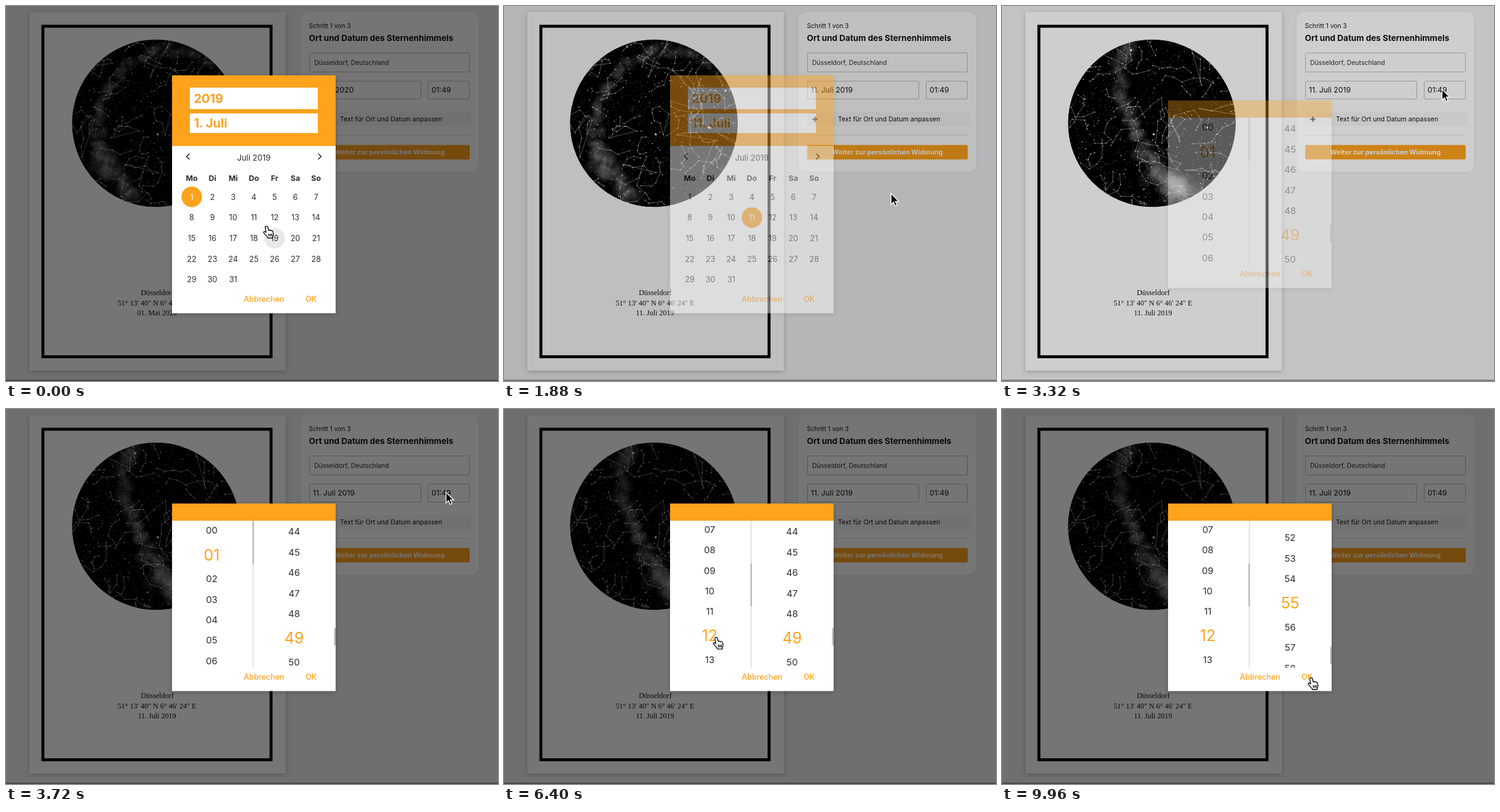
Animation, 800 px wide and 611 px high, one loop 10 s. Source, as an HTML page:

```html
<!DOCTYPE html>
<html lang="de">
<head>
<meta charset="utf-8">
<title>Sternenhimmel</title>
<style>
html, body { margin: 0; width: 100%; height: 100%; overflow: hidden; background: #f3f2f4; }
svg { display: block; width: 800px; height: 611px; }
text { font-family: Inter, "Open Sans", sans-serif; fill: #2c2c2e; white-space: pre; }
.serif { font-family: "Liberation Serif", serif; fill: #111; }
.mid { text-anchor: middle; }
.bold { font-weight: 700; }
.link { font-weight: 500; fill: #ffa21c; }
.white { fill: #fff; }
.orange { fill: #ffa21c; }
.ink { fill: #111; }
</style>
</head>
<body>
<script>
const LOOP = 10000, ORANGE = '#ffa21c', ROW = 33.4, GROW = 12;

// ---------- helpers ----------
const rect = (x, y, w, h, attrs) => `<rect x="${x}" y="${y}" width="${w}" height="${h}" ${attrs}/>`;
const text = (x, y, size, str, cls = '', id = '') =>
  `<text x="${x}" y="${y}" font-size="${size}" class="${cls}" ${id && `id="${id}"`}>${str}</text>`;
const line = (d, attrs) => `<path d="${d}" fill="none" ${attrs}/>`;
const clamp = v => Math.max(0, Math.min(1, v));
const ramp = (t, start, length) => clamp((t - start) / length);
const mix = (a, b, u) => a + (b - a) * u;

function randomizer(seed) {
  return () => {
    seed = (seed * 1664525 + 1013904223) % 4294967296;
    return seed / 4294967296;
  };
}

// ---------- star map ----------
const CX = 243.7, CY = 191, R = 136.5;

function skyMap(id, seed, band) {
  const rnd = randomizer(seed);
  const bell = () => rnd() + rnd() + rnd() - 1.5;
  const n1 = v => v.toFixed(1);
  const along = () => {
    const p = rnd() * (band.length - 1), i = Math.floor(p);
    return band[i].map((v, k) => mix(v, band[i + 1][k], p - i));
  };

  let haze = '';
  for (let i = 0; i < 330; i++) {
    const [x, y, w, glow] = along();
    const dark = rnd() < .16;
    const r = dark ? 1.5 + rnd() * 3 : 3 + rnd() * w * .55;
    haze += `<circle cx="${n1(x + bell() * w)}" cy="${n1(y + bell() * w * .8)}" r="${n1(r)}"
      fill="${dark ? '#000' : '#bbb'}" opacity="${n1(dark ? .3 : 0) || 0}"
      style="opacity:${dark ? .22 : (.1 * glow).toFixed(3)}"/>`;
  }

  const dots = ['', '', ''];
  const star = (size, x, y) => dots[size] += `M${n1(x)} ${n1(y)}h.01`;
  for (let i = 0; i < 760; i++) {
    const a = rnd() * 6.283, d = R * Math.sqrt(rnd());
    star(rnd() < .09 ? 1 : 0, CX + d * Math.cos(a), CY + d * Math.sin(a));
  }
  for (let i = 0; i < 160; i++) {
    const [x, y, w] = along();
    star(0, x + bell() * w, y + bell() * w);
  }

  // constellations: short wandering chains spread over a loose grid
  let chains = '';
  const step = 34;
  for (let gy = CY - R; gy < CY + R; gy += step) {
    for (let gx = CX - R; gx < CX + R; gx += step) {
      let x = gx + rnd() * step, y = gy + rnd() * step, a = rnd() * 6.283;
      const x0 = x, y0 = y, n = 2 + Math.floor(rnd() * 5);
      chains += `M${n1(x)} ${n1(y)}`;
      star(1, x, y);
      for (let k = 0; k < n; k++) {
        const len = 6 + rnd() * 15;
        a += (rnd() - .5) * 2.5;
        x += len * Math.cos(a);
        y += len * Math.sin(a);
        chains += `L${n1(x)} ${n1(y)}`;
        star(1, x, y);
      }
      if (n > 3 && rnd() < .4) chains += `L${n1(x0)} ${n1(y0)}`;
    }
  }
  const [bx, by] = band[0];
  star(2, bx - 2, by + 16);
  star(2, CX + 3, CY + 18);
  star(2, CX + 90, CY + 7);

  return `<g id="${id}" clip-path="url(#disc)">
    <circle cx="${CX}" cy="${CY}" r="${R}"/>
    <g filter="url(#soft)">${haze}</g>
    ${line(chains, 'stroke="#ddd" stroke-width=".7" opacity=".72"')}
    ${dots.map((d, i) => line(d, `stroke="#fff" stroke-linecap="round" stroke-width="${[.95, 1.8, 3.6][i]}" opacity="${[.75, .85, 1][i]}"`)).join('')}
  </g>`;
}

const skyMay = skyMap('skyMay', 71, [
  [362, 122, 8, .3], [310, 78, 10, .4], [245, 71, 12, .6], [188, 102, 11, .7],
  [152, 160, 10, .7], [147, 225, 13, .9], [165, 270, 18, 1], [205, 308, 18, .9]]);
const skyJuly = skyMap('skyJuly', 2019, [
  [212, 56, 13, .6], [189, 95, 10, .55], [193, 150, 11, .7],
  [218, 203, 13, .9], [240, 250, 15, 1], [268, 292, 24, 1], [290, 308, 28, 1]]);

// ---------- page ----------
const field = (x, y, w, h) => rect(x, y, w, h, 'rx="1.5" fill="#fff" stroke="#bdbcbe"');

const page = `
  ${rect(0, 0, 800, 611, 'fill="#f3f2f4"')}
  ${rect(38, 10, 417, 584, 'fill="#fff" filter="url(#shade)"')}
  ${rect(60, 33, 371, 538.5, 'fill="none" stroke="#000" stroke-width="4.8"')}
  ${skyMay}${skyJuly}
  ${text(246, 471, 12.2, 'Düsseldorf', 'serif mid')}
  ${text(245.5, 487.5, 12, '51° 13′ 40″ N 6° 46′ 24″ E', 'serif mid')}
  ${text(245.5, 504, 12, '', 'serif mid', 'posterDate')}
  ${rect(479, 10, 289, 260, 'rx="12" fill="#fff" filter="url(#faint)"')}
  ${text(492.5, 35.5, 10.2, 'Schritt 1 von 3', 'ink')}
  ${text(492.5, 56.5, 13.5, 'Ort und Datum des Sternenhimmels', 'bold ink')}
  ${field(493.5, 76.5, 260, 31)}
  ${text(501, 96, 10.5, 'Düsseldorf, Deutschland')}
  ${field(493.5, 122.5, 181, 29)}
  ${text(499, 140.5, 12.2, '', 'ink', 'fieldDate')}
  ${field(686.5, 122.5, 67, 29)}
  ${text(692, 140.5, 12.2, '01:49', 'ink')}
  ${rect(493, 173, 264, 22, 'fill="#f8f7f9"')}
  ${line('M501.5 184.5h8M505.5 180.5v8', 'stroke="#111" stroke-width="2"')}
  ${text(543, 188, 10.6, 'Text für Ort und Datum anpassen', 'ink')}
  ${line('M493 210.5H754', 'stroke="#c4c3c5" stroke-dasharray="1 1"')}
  ${rect(493, 226.5, 261, 23.5, `rx="2.5" fill="${ORANGE}"`)}
  ${text(623.5, 242, 10.8, 'Weiter zur persönlichen Widmung', 'bold white mid')}
  ${rect(0, 609, 800, 1.4, 'fill="#77767a"')}`;

// ---------- date dialog ----------
const dayX = c => 302 + 33.7 * c, dayY = r => 311 + 33.7 * r;
const dayPos = d => [dayX((d - 1) % 7), dayY(Math.floor((d - 1) / 7))];

let days = '';
for (let d = 1; d <= 31; d++) {
  const [x, y] = dayPos(d);
  days += text(x, y + 4.5, 12.6, d, 'mid', 'day' + d);
}
const buttons = y => text(419.5, y, 12.5, 'Abbrechen', 'link mid') + text(496, y, 12.5, 'OK', 'link mid');

const dateDialog = `<g id="dateDialog">
  ${rect(270, 113, 266, 387.5, 'fill="#fff" filter="url(#shade)"')}
  ${rect(270, 113, 266, 115, `fill="${ORANGE}"`)}
  ${rect(299, 133, 208, 35, 'fill="#fff"')}${rect(299, 175, 208, 32, 'fill="#fff"')}
  ${text(305.5, 158, 20, '2019', 'bold orange')}
  ${text(305.5, 197.5, 20, '', 'bold orange', 'headDate')}
  ${line('M298.5 240.5l-5 4.7 5 4.7M507.500 240.500l5 4.700-5 4.700', 'stroke="#222" stroke-width="1.4"')}
  ${text(403, 251.5, 13, 'Juli 2019', 'mid')}
  ${['Mo', 'Di', 'Mi', 'Do', 'Fr', 'Sa', 'So'].map((n, i) => text(dayX(i), 285, 12.4, n, 'bold mid')).join('')}
  <circle id="hover" r="16.8" fill="#e9e8ea"/>
  <circle id="chosen" r="16.7" fill="${ORANGE}"/>
  ${days}${buttons(482)}
</g>`;

// ---------- time dialog ----------
const numbers = (id, x, n) => Array.from({ length: n }, (_, i) =>
  text(x, 0, 15, String(i).padStart(2, '0'), 'mid', id + i)).join('');

const timeDialog = `<g id="timeDialog">
  ${rect(270, 154, 266, 305.500, 'fill="#fff" filter="url(#shade)"')}
  ${rect(270, 154, 266, 28, `fill="${ORANGE}"`)}
  <g clip-path="url(#list)">${numbers('h', 334.5, 24)}${numbers('m', 468.5, 60)}</g>
  ${rect(401, 182, 2, 239, 'fill="#e4e3e5"')}
  ${rect(400.7, 182, 2.5, 70, 'rx="1" fill="#b9b8ba" id="hThumb"')}
  ${rect(533.500, 182, 2.5, 28.500, 'rx="1" fill="#b9b8ba" id="mThumb"')}
  ${buttons(440.5)}
</g>`;

// ---------- pointer shapes ----------
const pointer = `<g id="pointer">
  <g id="hand" stroke="#000" stroke-width="1.3" stroke-linejoin="round">
    <path fill="#fff" d="M5.500 1c1.200-.3 2 .4 2.300 1.500l1.200 5c.8-.8 2-.6 2.400.3.900-.6 2-.3 2.300.6 1-.4 2 .1 2.300 1.200l.6 3c.3 2-.1 3.500-.9 5l-.3 2.400H7.800c-.6-2-2.200-3.400-4-5.200L1.200 11.600c-.8-1 .2-2.600 1.700-2L5 11 3.400 3.200C3.200 2 4.300 1.200 5.500 1z"/>
    <path fill="none" d="M9.300 13v4.300M11.700 13v4.300M14 13v4.300"/>
  </g>
  <path id="arrow" d="M.5 .5V18l4-3.700 2.600 6.200 3-1.300-2.600-6h5.300z" fill="#000" stroke="#fff" stroke-width="1.300"/>
  <g id="beam" fill="none">
    <path id="ibeam" d="M1 .8q3.500 0 3.500 2.500v13q0 2.500-3.500 2.500M8 .8q-3.500 0-3.500 2.500v13q0 2.500 3.500 2.500M2.800 11.500h3.400" stroke="#fff" stroke-width="3"/>
    <use href="#ibeam" style="--w:1"/>
    <path d="M1 .8q3.500 0 3.500 2.500v13q0 2.500-3.500 2.500M8 .8q-3.500 0-3.500 2.500v13q0 2.500 3.500 2.500M2.800 11.500h3.400" stroke="#000" stroke-width="1.400"/>
  </g>
</g>`;

document.body.innerHTML = `<svg viewBox="0 0 800 611">
  <defs>
    <clipPath id="disc"><circle cx="${CX}" cy="${CY}" r="${R}"/></clipPath>
    <clipPath id="list">${rect(270, 182, 266, 239.500, '')}</clipPath>
    <filter id="soft"><feGaussianBlur stdDeviation=".9"/></filter>
    <filter id="shade" x="-10%" y="-10%" width="120%" height="120%">
      <feDropShadow dx="0" dy="2" stdDeviation="4" flood-opacity=".22"/></filter>
    <filter id="faint" x="-10%" y="-10%" width="120%" height="120%">
      <feDropShadow dx="0" dy="1" stdDeviation="2" flood-opacity=".06"/></filter>
  </defs>
  ${page}
  ${rect(0, 0, 800, 611, 'id="dim"')}
  ${dateDialog}${timeDialog}${pointer}
</svg>`;

const $ = id => document.getElementById(id);
const show = (id, on) => $(id).style.display = on ? '' : 'none';
const put = (id, str) => { if ($(id).textContent !== str) $(id).textContent = str; };

// ---------- timing ----------
const PICK_DAY = 420, CLOSE = 1640, NEW_SKY = 2240, OPEN = 3180, PICK_HOUR = 6080, PICK_MIN = 8850;

const path = [ // time, x, y, shape
  [0, 418, 358, 'hand'], [250, 398, 338, 'hand'], [700, 398, 338, 'hand'],
  [1150, 491, 470, 'hand'], [1450, 491, 470, 'hand'], [1560, 520, 440, 'hand'],
  [1640, 548, 410, 'arrow'], [1680, 559, 400, 'arrow'], [2050, 680, 230, 'arrow'],
  [2400, 732, 118, 'beam'], [2520, 732, 114, 'beam'], [2850, 711, 130, 'beam'],
  [3250, 715, 135, 'arrow'], [3850, 715, 135, 'arrow'], [4100, 535, 190, 'hand'],
  [4400, 318, 264, 'hand'], [5500, 318, 264, 'hand'], [5900, 328, 376, 'hand'],
  [6300, 328, 376, 'hand'], [6900, 480, 311, 'hand'], [9200, 480, 311, 'hand'],
  [9750, 497, 437, 'hand'], [LOOP, 497, 437, 'hand']];

const hourScroll = [[4450, 0], [5160, 212], [5400, 235.500]];
const minuteScroll = [[7400, 1467.6], [7800, 1496], [8400, 1724.8]];
const hourHover = [[2, 4250, 4800], [6, 4800, 5200], [9, 5250, 5650], [12, 5780, 6500]];
const minuteHover = [[47, 6800, 7900], [51, 7980, 8250], [55, 8380, 9500]];

// Smooth curve through keys, resting wherever two neighbours are equal.
function track(keys, t, k) {
  const last = keys.length - 1;
  if (t <= keys[0][0]) return keys[0][k];
  if (t >= keys[last][0]) return keys[last][k];
  const i = keys.findIndex(p => p[0] > t) - 1;
  const slope = j => {
    const a = keys[j - 1], b = keys[j], c = keys[j + 1];
    if (!a || !c || (b[k] - a[k]) * (c[k] - b[k]) <= 0) return 0;
    return (c[k] - a[k]) / (c[0] - a[0]);
  };
  const a = keys[i], b = keys[i + 1], h = b[0] - a[0], u = (t - a[0]) / h, v = 1 - u;
  return v * v * (1 + 2 * u) * a[k] + u * u * (3 - 2 * u) * b[k]
    + h * u * v * (v * slope(i) - u * slope(i + 1));
}

function drawList(id, count, t, scroll, hovers, chosen, before, picked) {
  let y = 198 - ROW / 2 - scroll;
  for (let i = 0; i < count; i++) {
    let big = i === chosen ? 1 : 0;
    if (i === before) big = 1 - ramp(t, picked, 120);
    for (const [item, on, off] of hovers)
      if (item === i) big = Math.max(big, ramp(t, on, 120) - ramp(t, off, 120));
    const h = ROW + GROW * big, mid = y + h / 2, size = mix(15, 25, big), el = $(id + i);
    const seen = mid > 150 && mid < 450;
    el.style.display = seen ? '' : 'none';
    if (seen) {
      el.setAttribute('y', mid + size * .364);
      el.setAttribute('font-size', size);
      el.style.fill = i === chosen ? ORANGE : '';
    }
    y += h;
  }
  $(id + 'Thumb').setAttribute('y', 182 + scroll * 240 / (count * ROW + GROW));
}

function draw(t) {
  const x = track(path, t, 1), y = track(path, t, 2);
  const shape = path.filter(p => p[0] <= t).pop()[3];
  $('pointer').setAttribute('transform', `translate(${x} ${y})`);
  for (const s of ['hand', 'arrow', 'beam']) show(s, s === shape);

  const dateOn = 1 - ramp(t, CLOSE, 450), timeOn = ramp(t, OPEN, 400);
  $('dim').setAttribute('opacity', .54 * Math.max(dateOn, timeOn));
  for (const [id, on] of [['dateDialog', dateOn], ['timeDialog', timeOn]]) {
    show(id, on > 0);
    $(id).setAttribute('opacity', on);
  }

  const saved = t >= CLOSE - 40;
  put('posterDate', saved ? '11. Juli 2019' : '01. Mai 2020');
  put('fieldDate', saved ? '11. Juli 2019' : '1. Mai 2020');
  show('skyMay', t < NEW_SKY);
  show('skyJuly', t >= NEW_SKY);

  if (dateOn) {
    const day = t < PICK_DAY ? 1 : 11;
    put('headDate', day + '. Juli');
    const place = (id, [cx, cy]) => { $(id).setAttribute('cx', cx); $(id).setAttribute('cy', cy); };
    place('chosen', dayPos(day));
    for (const d of [1, 11]) $('day' + d).style.fill = d === day ? '#fff' : '';
    const col = Math.round((x + 6 - 302) / 33.7), row = Math.round((y + 9 - 311) / 33.7);
    const over = row * 7 + col + 1;
    const valid = shape === 'hand' && col >= 0 && col < 7 && over >= 1 && over <= 31;
    show('hover', valid);
    if (valid) place('hover', dayPos(over));
  }
  if (timeOn) {
    drawList('h', 24, t, track(hourScroll, t, 1), hourHover, t < PICK_HOUR ? 1 : 12, t < PICK_HOUR ? -1 : 1, PICK_HOUR);
    drawList('m', 60, t, track(minuteScroll, t, 1), minuteHover, t < PICK_MIN ? 49 : 55, t < PICK_MIN ? -1 : 49, PICK_MIN);
  }
}

const start = performance.now();
function tick() {
  draw((performance.now() - start) % LOOP);
  requestAnimationFrame(tick);
}
tick();
</script>
</body>
</html>
```
